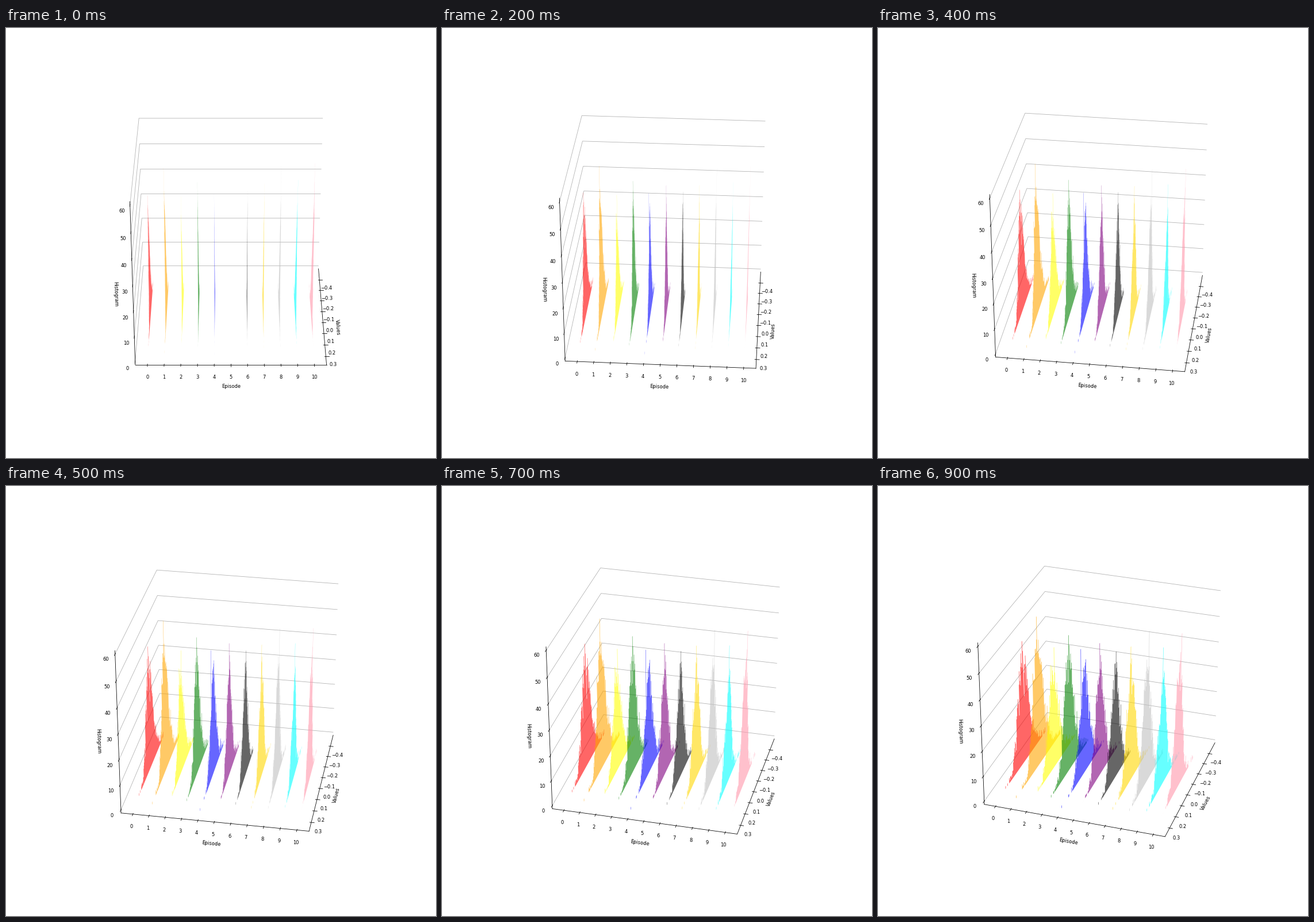
Animation of 748x748 px, one loop 1000 ms. Source, as a matplotlib script:

```python
import numpy as np
import matplotlib.pyplot as plt
from matplotlib.animation import FuncAnimation
from matplotlib.collections import LineCollection, PolyCollection
from matplotlib.colors import to_rgba

SIZE, DPI = 748, 68
FRAMES, INTERVAL = 10, 100
PT = 72 / DPI                       # points per pixel
ELEV, DISTANCE = np.radians(30), 10
SCALE = np.array([3133.5, -3052.6])
CENTER = np.array([391.2, 364.5])
EDGE = 0.5 + 1 / 48                 # half side of the padded box
TICK_PAD, LABEL_PAD = 0.0402, 0.0876
TICK_OUT, TICK_IN = 0.2 / 12, 0.1 / 12
BIN = 0.0065

# colour, peak position, peak height, lone outlier (or None)
EPISODES = [
    ("red", -0.030, 48, None),
    ("orange", -0.020, 58.5, 0.298),
    ("yellow", -0.040, 47, None),
    ("green", -0.025, 53, None),
    ("blue", 0.024, 50.5, 0.314),
    ("purple", -0.020, 52, None),
    ("black", -0.025, 49.5, 0.233),
    ("gold", -0.010, 53, 0.253),
    ("silver", -0.040, 58.5, 0.240),
    ("cyan", -0.008, 54.5, 0.217),
    ((1, 0.59, 0.67), -0.040, 59.5, -0.304),
]


def u_of(episode):
    return (episode - 5) / 11


def v_of(value):
    return -(value + 0.068) / 0.85


def w_of(count):
    return count / 60 - 0.5


def project(points, azim):
    """Box coordinates (u right, v away, w up) to pixels."""
    u, v, w = np.moveaxis(np.asarray(points, float), -1, 0)
    right = -u * np.sin(azim) + v * np.cos(azim)
    toward = u * np.cos(azim) + v * np.sin(azim)
    up = w * np.cos(ELEV) - toward * np.sin(ELEV)
    depth = DISTANCE - toward * np.cos(ELEV) - w * np.sin(ELEV)
    return CENTER + SCALE * np.stack([right / depth, up / depth], axis=-1)


def step_outline(episode, starts, counts):
    """Closed outline of neighbouring bars standing on the floor."""
    values = np.stack([starts, starts + BIN], axis=1).ravel()
    heights = np.repeat(counts, 2)
    values = np.concatenate([values[:1], values, values[-1:]])
    heights = np.concatenate([[0], heights, [0]])
    return np.stack([np.full(len(values), u_of(episode)),
                     v_of(values), w_of(heights)], axis=1)


def build_histograms():
    rng = np.random.default_rng(7)
    starts = np.arange(-0.33, 0.245, BIN)
    mids = starts + BIN / 2
    shapes, colors = [], []
    for k, (color, peak_at, peak, outlier) in enumerate(EPISODES):
        sigma = 0.076 - 0.0014 * k
        bell = 0.8 * peak * np.exp(-0.5 * ((mids + 0.02) / sigma) ** 2)
        tail = (2.6 - 0.17 * k) * np.exp(-0.5 * ((mids + 0.22) / 0.05) ** 2)
        mean = bell + tail
        counts = np.round(mean + 0.75 * (rng.poisson(mean) - mean))
        counts = np.minimum(counts, peak - 4)
        counts[np.argmin(abs(mids - peak_at))] = peak
        parts = [(starts, counts)]
        if outlier is not None:
            parts.append((np.array([outlier]), np.array([1])))
        for part in parts:
            shapes.append(step_outline(k, *part))
            colors.append(to_rgba(color, 0.6))
    return shapes, colors


SHAPES, SHAPE_COLORS = build_histograms()

# name, edge ends, outward label direction, tick direction, tick positions, tick texts
AXES = [
    ("Episode", (-EDGE, -EDGE, -EDGE), (EDGE, -EDGE, -EDGE), (0, -1, -1), (0, -1, 0),
     [u_of(k) for k in range(11)], [str(k) for k in range(11)]),
    ("Values", (EDGE, -EDGE, -EDGE), (EDGE, EDGE, -EDGE), (1, 0, -1), (1, 0, 0),
     [v_of(k / 10) for k in range(-4, 4)],
     [f"{k / 10:.1f}".replace("-", "\u2212") for k in range(-4, 4)]),
    ("Histogram", (-EDGE, -EDGE, -EDGE), (-EDGE, -EDGE, EDGE), (-1, -1, 0), (0, -1, 0),
     [w_of(z) for z in range(0, 61, 10)], [str(z) for z in range(0, 61, 10)]),
]

fig = plt.figure(figsize=(SIZE / DPI, SIZE / DPI), dpi=DPI, facecolor="white")
ax = fig.add_axes([0, 0, 1, 1])


def put_text(pos, text, **kwargs):
    ax.text(*pos, text, ha="center", fontsize=8.33 * PT, family="DejaVu Sans",
            color="black", **kwargs)


def draw_grid(azim):
    lines = [project([(-EDGE, -EDGE, w), (-EDGE, EDGE, w), (EDGE, EDGE, w)], azim)
             for w in map(w_of, range(0, 61, 10))]
    ax.add_collection(LineCollection(lines, colors="#b0b0b0", linewidths=0.8 * PT,
                                     zorder=1))


def draw_axis(index, azim):
    name, start, end, outward, tick_dir, places, texts = AXES[index]
    start, end, outward, tick_dir = map(np.array, (start, end, outward, tick_dir))
    style = dict(color="black", lw=0.8 * PT, zorder=2)
    ends = project([start, end], azim)
    ax.plot(*ends.T, **style)

    for place, text in zip(places, texts):
        pos = start.copy()
        pos[index] = place
        tick = project([pos + TICK_OUT * tick_dir, pos - TICK_IN * tick_dir], azim)
        ax.plot(*tick.T, **style)
        put_text(project(pos + TICK_PAD * outward, azim), text, va="top")

    dx, dy = ends[1] - ends[0]
    angle = np.degrees(np.arctan2(-dy, dx)) % 180
    if angle > 90:
        angle -= 180
    middle = (start + end) / 2 + LABEL_PAD * outward
    put_text(project(middle, azim), name, va="center", rotation=angle)


def draw(frame):
    azim = np.radians(-90 + 2 * frame)
    ax.clear()
    ax.axis("off")
    ax.set_xlim(0, SIZE)
    ax.set_ylim(SIZE, 0)
    draw_grid(azim)
    for index in range(3):
        draw_axis(index, azim)
    outlines = [project(shape, azim) for shape in SHAPES]
    ax.add_collection(PolyCollection(outlines, facecolors=SHAPE_COLORS,
                                     edgecolors="none", linewidths=0, zorder=3),
                      autolim=False)
    return []


anim = FuncAnimation(fig, draw, frames=FRAMES, interval=INTERVAL,
                     init_func=lambda: [], repeat=True, repeat_delay=0)
plt.show()
```
